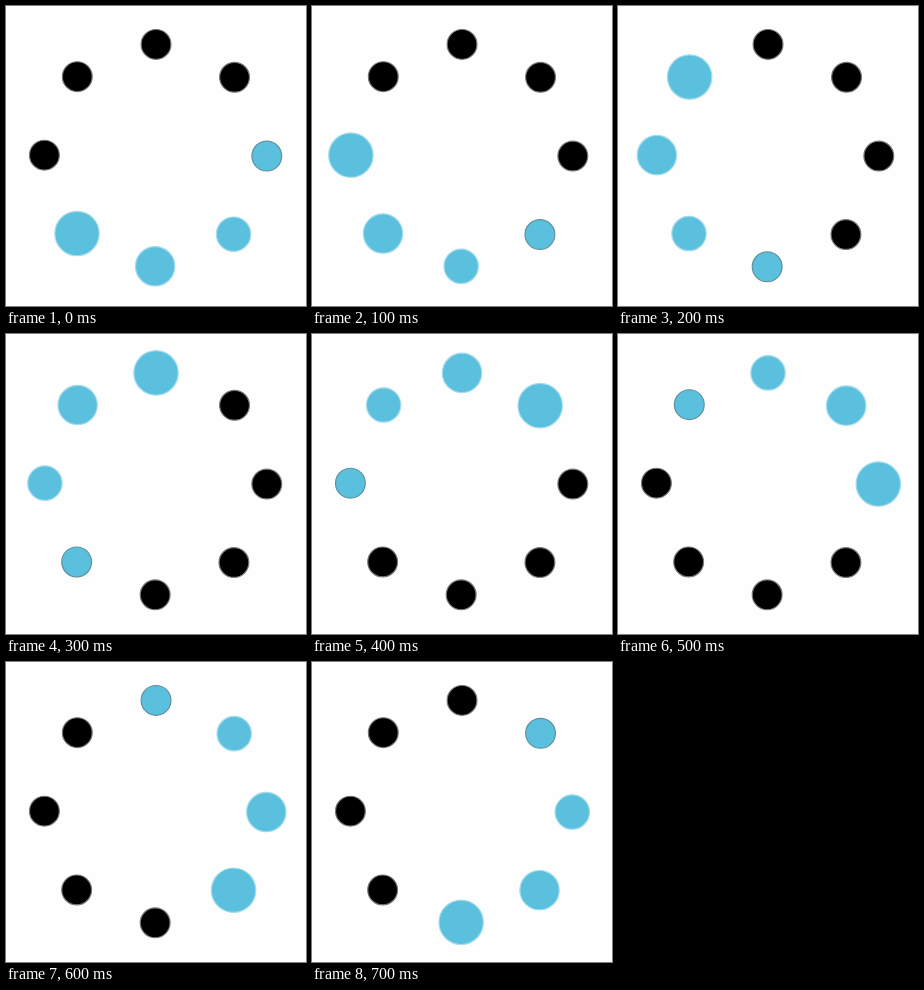
An HTML page with a canvas that plays this animation: 300 px wide and 300 px high, repeating every 800 ms.

```html
<!DOCTYPE html>
<html lang="en">
<head>
<meta charset="utf-8">
<title>Loading ring</title>
<style>
html, body { margin: 0; width: 100%; height: 100%; overflow: hidden; background: #fefefe; }
canvas { display: block; width: 300px; height: 300px; }
</style>
</head>
<body>
<canvas id="stage"></canvas>
<script>
const SIZE = 300, COUNT = 8, STEP = 100;
const CENTER = 149.6, TILT = 0.004;
const ORBIT = 111.2, TRAIL_ORBIT = 110.7;
const BLUE = '#5bc0de', BLACK = '#000';
const TRAIL = [22.8, 20.3, 17.8]; // radii from the head backwards
const REST = 15.5;

const canvas = document.getElementById('stage');
const ctx = canvas.getContext('2d');
const ratio = window.devicePixelRatio || 1;
canvas.width = canvas.height = SIZE * ratio;
ctx.scale(ratio, ratio);

function disc(angle, orbit, r, fill, edge) {
  const x = CENTER + orbit * Math.cos(angle);
  const y = CENTER + orbit * Math.sin(angle);
  ctx.beginPath();
  ctx.arc(x, y, r - 0.6, 0, Math.PI * 2);
  ctx.fillStyle = fill;
  ctx.fill();
  ctx.strokeStyle = edge;
  ctx.lineWidth = 1.2;
  ctx.stroke();
}

function draw(time) {
  const head = (3 + Math.floor(time / STEP)) % COUNT;
  ctx.fillStyle = '#fefefe';
  ctx.fillRect(0, 0, SIZE, SIZE);
  for (let i = 0; i < COUNT; i++) {
    const angle = i * Math.PI * 2 / COUNT + TILT;
    const age = (head - i + COUNT) % COUNT;
    if (age < TRAIL.length) disc(angle, TRAIL_ORBIT, TRAIL[age], BLUE, '#a5dcec');
    else if (age === TRAIL.length) disc(angle, ORBIT, REST, BLUE, '#5f929f');
    else disc(angle, ORBIT, REST, BLACK, '#777');
  }
}

const start = performance.now();
function tick() {
  draw((performance.now() - start) % (COUNT * STEP));
  requestAnimationFrame(tick);
}
tick();
</script>
</body>
</html>
```
